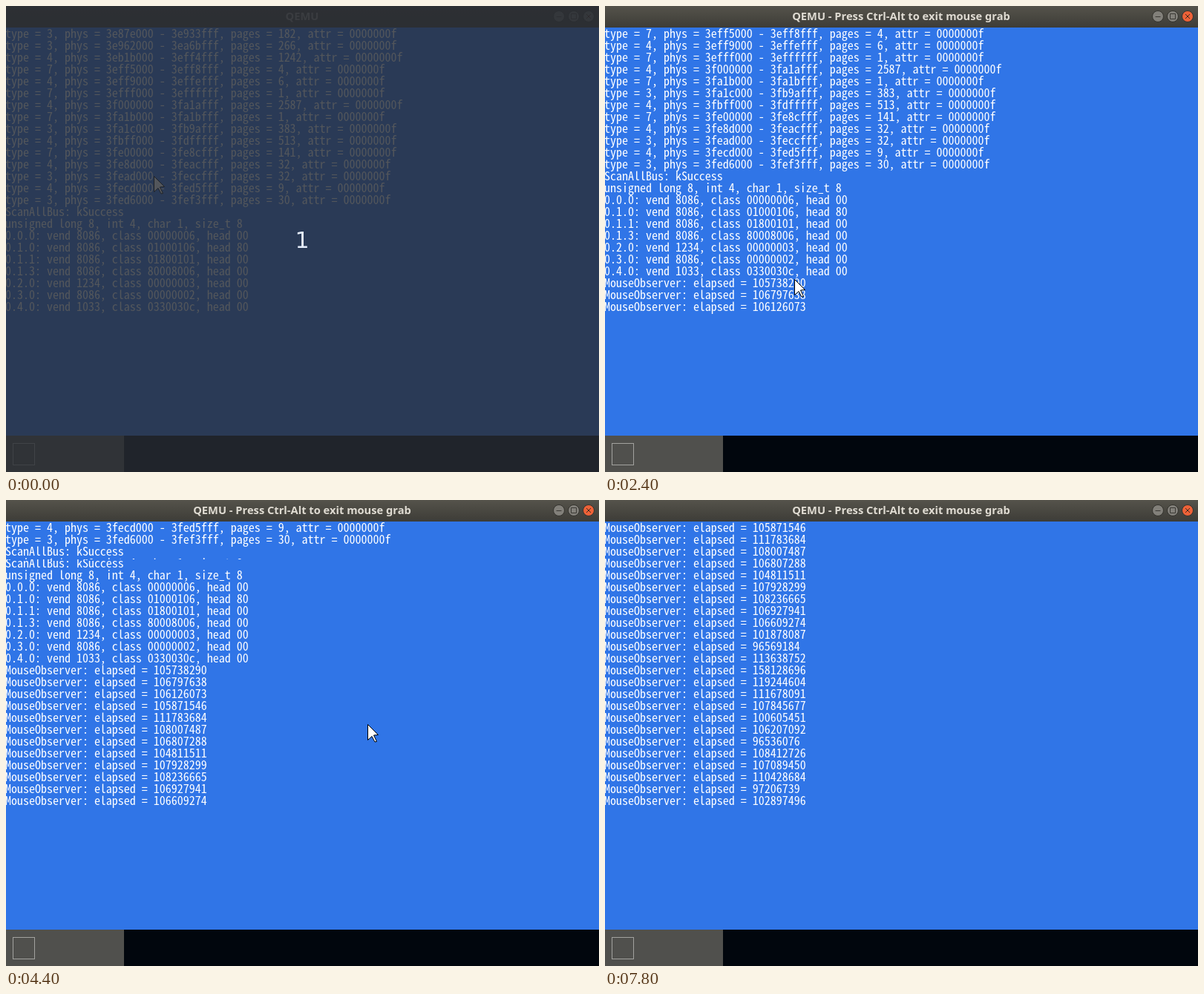
Write an HTML page with a canvas that moves like this. It is 799x628 px and loops after 8 s.

```html
<!DOCTYPE html>
<html>
<head>
<meta charset="utf-8">
<style>
html, body { margin: 0; width: 100%; height: 100%; overflow: hidden; background: #01060d; }
canvas { display: block; }
</style>
</head>
<body>
<canvas id="stage" width="799" height="628"></canvas>
<script>
const ctx = document.getElementById('stage').getContext('2d');
const W = 799, H = 628, LOOP = 8000, STEP = 100;
const ROWS = 24, ROW_H = 16, TOP = 30;
const TITLE = 'QEMU - Press Ctrl-Alt to exit mouse grab';

const memory = `3 3e87e000 3e933fff 182
3 3e962000 3ea6bfff 266
4 3eb1b000 3eff4fff 1242
7 3eff5000 3eff8fff 4
4 3eff9000 3effefff 6
7 3efff000 3effffff 1
4 3f000000 3fa1afff 2587
7 3fa1b000 3fa1bfff 1
3 3fa1c000 3fb9afff 383
4 3fbff000 3fdfffff 513
7 3fe00000 3fe8cfff 141
4 3fe8d000 3feacfff 32
3 3fead000 3feccfff 32
4 3fecd000 3fed5fff 9
3 3fed6000 3fef3fff 30`;
const devices = `0.0.0 8086 00000006 00
0.1.0 8086 01000106 80
0.1.1 8086 01800101 00
0.1.3 8086 80008006 00
0.2.0 1234 00000003 00
0.3.0 8086 00000002 00
0.4.0 1033 0330030c 00`;
const elapsed = `105738290 106797638 106126073 105871546 111783684 108007487 106807288
104811511 107928299 108236665 106927941 106609274 101878087 96569184 113638752 158128696
119244604 111678091 107845677 100605451 106207092 96536076 108412726 107089450 110428684
97206739 102897496`;

const rows = (text, format) => text.split('\n').map(line => format(...line.split(' ')));
const log = [
  ...rows(memory, (type, from, to, pages) =>
    `type = ${type}, phys = ${from} - ${to}, pages = ${pages}, attr = 0000000f`),
  'ScanAllBus: kSuccess',
  'unsigned long 8, int 4, char 1, size_t 8',
  ...rows(devices, (id, vendor, kind, head) =>
    `${id}: vend ${vendor}, class ${kind}, head ${head}`),
  ...elapsed.split(/\s+/).map(n => `MouseObserver: elapsed = ${n}`)
];

// Picks the font size at which a sample text has the given width.
function fontFor(style, family, sample, width) {
  ctx.font = `${style} 16px ${family}`;
  return `${style} ${16 * width / ctx.measureText(sample).width}px ${family}`;
}
const consoleFont = fontFor('300', '"Noto Sans Mono CJK JP", "Liberation Mono", monospace', '00000000', 64);
const titleFont = fontFor('bold', '"Noto Sans", "Open Sans", sans-serif', TITLE, 294);

// Scrolled lines: one each 200 ms, with a pause after the 13th.
const lineTime = n => n < 2 ? 1800 : n < 14 ? 1800 + 200 * n : 2400 + 200 * n;
const torn = new Set([1, 6, 8, 13, 14, 15, 16, 19, 23, 25, 26]);

const guestPath = [[1900, 199, 229], [2400, 255, 368], [2900, 318, 519]];
const guestReturn = [[3800, 440, 385], [4400, 487, 302]];
const hostPath = [[700, 114, 26], [900, 162, 105], [1000, 162, 105], [1400, 291, 282]];

function along(path, t) {
  if (t <= path[0][0]) return path[0].slice(1);
  for (let i = 1; i < path.length; i++) {
    const [t0, x0, y0] = path[i - 1], [t1, x1, y1] = path[i];
    if (t <= t1) {
      const k = (t - t0) / (t1 - t0);
      return [Math.round(x0 + (x1 - x0) * k), Math.round(y0 + (y1 - y0) * k)];
    }
  }
  return path[path.length - 1].slice(1);
}

function box(x, y, w, h, color) {
  ctx.fillStyle = color;
  ctx.fillRect(x, y, w, h);
}

function drawConsole(first, y0, y1) {
  ctx.save();
  ctx.beginPath();
  ctx.rect(0, y0, W, y1 - y0);
  ctx.clip();
  ctx.font = consoleFont;
  ctx.textAlign = 'left';
  ctx.fillStyle = '#fff';
  for (let i = 0; i < ROWS; i++) ctx.fillText(log[first + i], -1, TOP + 13 + i * ROW_H);
  ctx.restore();
}

function drawText(t) {
  let n = 0;
  while (n < 27 && t >= lineTime(n + 1)) n++;
  const tearing = torn.has(n) && t < lineTime(n) + STEP;
  const split = tearing ? TOP + n * 150 % 380 : 579;
  drawConsole(n, 29, split);
  if (tearing) drawConsole(n - 1, split, 579);
}

function arrow([x, y], scale, fill, edge) {
  ctx.save();
  ctx.translate(x + 0.5, y + 0.5);
  ctx.scale(scale, scale);
  ctx.beginPath();
  for (const [px, py] of [[0, 0], [14, 14], [8, 14.5], [12, 23], [9.5, 23.5], [5.5, 16], [0, 21]])
    ctx.lineTo(px, py);
  ctx.closePath();
  ctx.fillStyle = fill;
  ctx.strokeStyle = edge;
  ctx.lineWidth = 1;
  ctx.fill();
  ctx.stroke();
  ctx.restore();
}

function button(x, fill, mark, shape) {
  ctx.beginPath();
  ctx.arc(x, 14, 7.5, 0, 7);
  ctx.fillStyle = fill;
  ctx.fill();
  ctx.strokeStyle = '#34332e';
  ctx.lineWidth = 1;
  ctx.stroke();
  ctx.strokeStyle = mark;
  ctx.stroke(new Path2D(shape));
}

function drawTitle(active) {
  const shade = ctx.createLinearGradient(0, 0, 0, 29);
  shade.addColorStop(0, active ? '#55534b' : '#403f3a');
  shade.addColorStop(1, active ? '#3d3c37' : '#3c3b37');
  box(0, 0, W, 29, shade);
  ctx.font = titleFont;
  ctx.textAlign = 'center';
  ctx.fillStyle = active ? '#dfdbd2' : '#807d78';
  ctx.fillText(active ? TITLE : 'QEMU', 399, 19);
  const grey = active ? '#82807a' : '#66645d';
  button(745, grey, '#3a3934', 'M741.5 14.5h7');
  button(765, grey, '#3a3934', 'M761.5 10.5h7v7h-7z');
  button(785, active ? '#ee6238' : grey, '#3f2a20', 'M782 11l6 6m0-6l-6 6');
}

function drawCountdown() {
  box(0, 0, W, H, 'rgba(40,44,51,.8)');
  ctx.font = '30px "DejaVu Sans", sans-serif';
  ctx.textAlign = 'center';
  ctx.fillStyle = '#e4ecfa';
  ctx.fillText('1', 399, 326);
}

function draw(t) {
  box(0, 0, W, H, '#3075e7');
  box(0, 579, W, 49, '#01060d');
  box(0, 579, 159, 49, '#50504d');
  ctx.strokeStyle = '#a2a29e';
  ctx.lineWidth = 1;
  ctx.strokeRect(9.5, 589.5, 29, 29);
  drawText(t);
  if (t < 3100) arrow(along(guestPath, t), 1, '#fff', '#000');
  else if (t >= 3800 && t < 4600) arrow(along(guestReturn, t), 1, '#fff', '#000');
  drawTitle(t >= 1600);
  if (t >= 700 && t < 1600) arrow(along(hostPath, t), 0.72, '#000', '#dde4f0');
  if (t < 100) drawCountdown();
}

const start = performance.now();
function tick() {
  const t = (performance.now() - start) % LOOP;
  draw(Math.floor(t / STEP) * STEP);
  requestAnimationFrame(tick);
}
tick();
</script>
</body>
</html>
```
